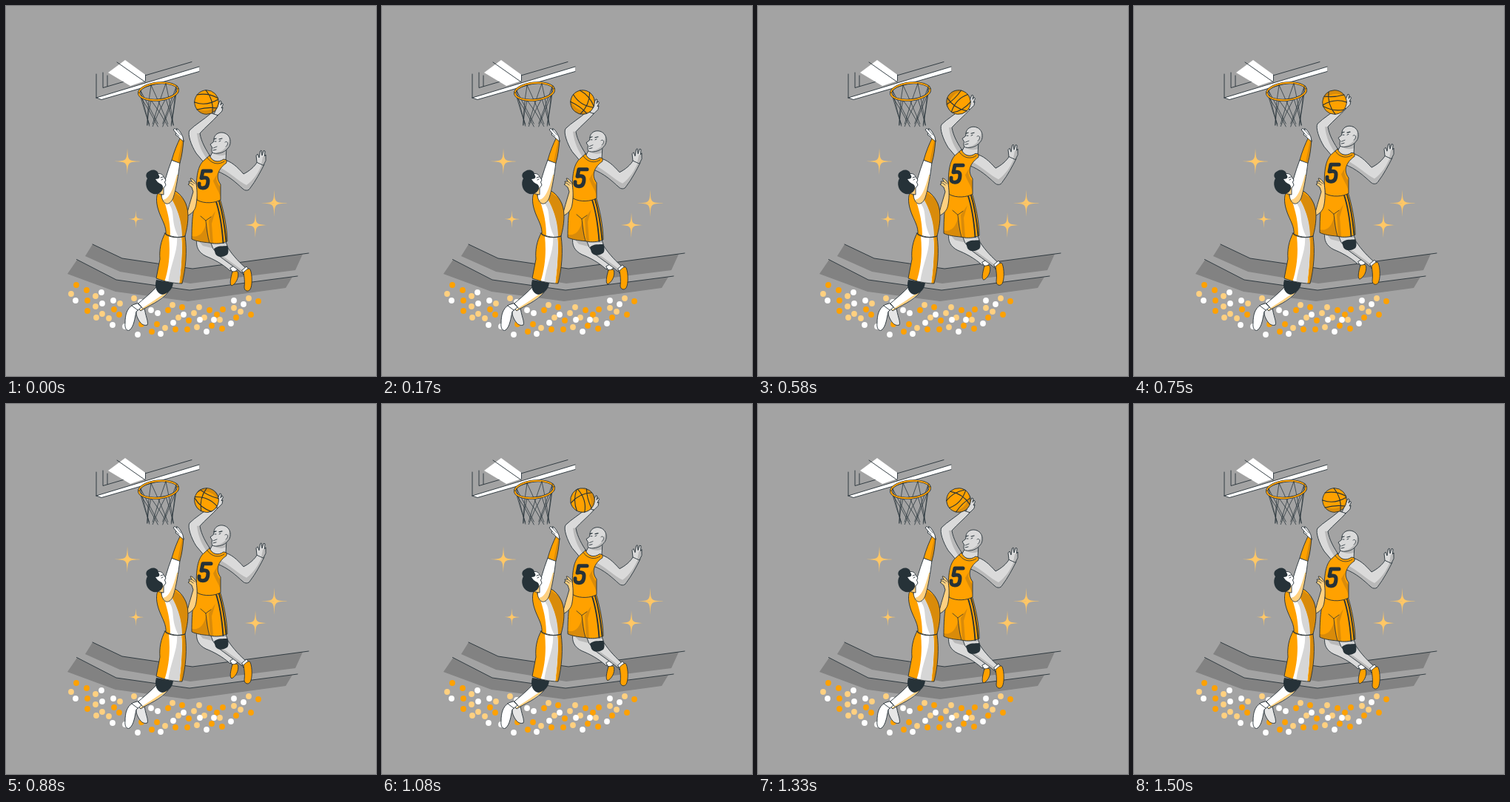
Recreate the animation shown at these times as an HTML page with a canvas. Size 500 by 500 pixels, loop 1540 ms.

```html
<!DOCTYPE html>
<html lang="en">
<head>
<meta charset="utf-8">
<title>Basketball</title>
<style>
  html, body { margin: 0; width: 100%; height: 100%; overflow: hidden; background: #a3a3a3; }
  canvas { display: block; width: 500px; height: 500px; }
</style>
</head>
<body>
<canvas id="stage"></canvas>
<script>
const LOOP = 1540, CYCLE = 1500, STEP = 1000 / 24, PHASE = 45, LIFT = 10;
const INK = '#263238', ORANGE = '#ffa100', SHADE = '#d98b0a', PEACH = '#ffd080', GOLD = '#ffc766',
      WHITE = '#fff', PALE = '#d6d6d6', SKIN = '#dadada', SKIN_SHADE = '#b9b9b9', STAND = '#828282';

const canvas = document.getElementById('stage');
const scale = Math.max(1, window.devicePixelRatio || 1);
canvas.width = canvas.height = 500 * scale;
const ctx = canvas.getContext('2d');

const paths = new Map();
function pathOf(d) {
  if (!paths.has(d)) paths.set(d, new Path2D(d));
  return paths.get(d);
}
function fill(d, color) {
  ctx.fillStyle = color;
  ctx.fill(pathOf(d));
}
function line(d, width = 0.9, color = INK) {
  ctx.strokeStyle = color;
  ctx.lineWidth = width;
  ctx.stroke(pathOf(d));
}
function shape(d, color, width) {
  fill(d, color);
  line(d, width);
}
// Fills a shape, lays shading inside it, then outlines it.
function shaded(d, color, ...shades) {
  fill(d, color);
  ctx.save();
  ctx.clip(pathOf(d));
  for (const [area, tone] of shades) fill(area, tone);
  ctx.restore();
  line(d);
}

function drawStands() {
  fill('M117 322 L157 341 L252 355 L401 335 L391 357 L249 375 L154 359 L107 338Z', STAND);
  fill('M96 343 L149 370 L248 384 L387 366 L378 381 L246 399 L148 386 L83 362Z', STAND);
  line('M117 322 L157 341 L252 355 L409 334');
  line('M95.5 342.5 L149 370 L248 384 L394 365');
}

const crowd = [
  [ORANGE, [95,377, 109,384, 110,398, 110,412, 146,410, 153,417, 183,430, 219,411, 204,430, 197,440,
    238,407, 247,425, 229,437, 245,437, 275,411, 285,417, 293,410, 278,432, 292,436, 311,421, 341,399, 331,417]],
  [PEACH, [88,389, 121,392, 121,406, 130,416, 122,421, 154,402, 139,422, 173,395, 225,404, 215,435,
    233,421, 261,407, 254,415, 268,421, 289,424, 258,434, 308,408, 317,413, 328,395]],
  [WHITE, [94,398, 129,387, 130,402, 145,398, 144,431, 161,433, 178,444, 182,400, 196,411, 205,415,
    209,443, 240,417, 226,428, 262,424, 281,424, 304,429, 271,440, 308,398, 321,403]]
];
function drawCrowd() {
  for (const [color, dots] of crowd) {
    ctx.fillStyle = color;
    for (let i = 0; i < dots.length; i += 2) {
      ctx.beginPath();
      ctx.arc(dots[i], dots[i + 1], 3.9, 0, Math.PI * 2);
      ctx.fill();
    }
  }
}

function drawStar(x, y, r) {
  const k = r * 0.04;
  ctx.save();
  ctx.translate(x, y);
  ctx.fillStyle = GOLD;
  for (let i = 0; i < 4; i++) {
    ctx.beginPath();
    ctx.moveTo(0, 0.5);
    ctx.lineTo(0, -r);
    ctx.bezierCurveTo(k, -k, k, -k, r, 0);
    ctx.lineTo(-0.5, 0.5);
    ctx.fill();
    ctx.rotate(Math.PI / 2);
  }
  ctx.restore();
}

function drawRim(from, to) {
  for (const [width, color] of [[3.2, INK], [1.9, ORANGE]]) {
    ctx.beginPath();
    ctx.ellipse(206, 115.5, 26.5, 11.5, -0.1, from, to);
    ctx.strokeStyle = color;
    ctx.lineWidth = width;
    ctx.stroke();
  }
}
function drawNet() {
  ctx.strokeStyle = INK;
  ctx.lineWidth = 0.75;
  const count = 8;
  for (let i = 0; i < count; i++) {
    for (const turn of [-1, 1]) {
      const a = (i + 0.5) / count * Math.PI * 2, b = a + turn;
      ctx.beginPath();
      ctx.moveTo(206 + 26 * Math.cos(a), 116 - 3 * Math.cos(a) + 11 * Math.sin(a));
      ctx.quadraticCurveTo(207 + 20 * Math.cos((a + b) / 2), 140 + 5 * Math.sin(a),
        208.5 + 18 * Math.cos(b), 161 + 2 * Math.sin(b));
      ctx.stroke();
    }
  }
}
function drawHoop() {
  line('M122 92 V124 M131 90 V110.5 L251 75.5 M137 94 V108.5');
  fill('M138 90 L161 73 L188.5 93 V101 L168 108Z', WHITE);
  line('M150 76 L188.5 103 M188.5 93 V101');
  fill('M122 124 L261 82 V88.5 L129 126.5Z', WHITE);
  line('M122 124 L261 82 M122 124 L129 126.5 L261 88.5');
  drawRim(Math.PI, Math.PI * 2);
  drawNet();
  drawRim(0, Math.PI);
}

function drawDunkerLegs() {
  shaded('M258 315 C256 325 260 333 270 338 C280 342 292 348 303 358 L309 353 C304 345 296 335 286 331 L277 318Z',
    SKIN, ['M258 315 L277 318 L282 328 L266 324Z', SKIN_SHADE]);
  shape('M303 354 L310 350 L313 356 L307 361Z', WHITE);
  shape('M306 359 C310 359 312 357 313.5 360 C315 368 310 376 305 378 C302 377 303 369 306 359Z', ORANGE);
  shaded('M276 317 L297 318 L300 327 C307 338 317 348 325 355 L319 361 C308 352 296 344 287 337 L280 328Z',
    SKIN, ['M276 317 L297 318 L298 322 L278 322Z M286 336 L296 340 L322 359 L319 363Z', SKIN_SHADE]);
  fill('M281 328 C287 323 293 325 299 324 C301 328 301 334 299 336 C293 340 286 340 283 335Z', INK);
  shape('M319 357 L325 352 L329 357 L321 363Z', WHITE);
  shape('M321 360 C324 357 328 353 330 356 C333 363 333 378 330 383 C327 387 322 385 322 380 C323 373 322 366 321 360Z', ORANGE);
}
function drawDunkerShorts() {
  shaded('M258 261 C253 272 251 286 251 315 C257 318 265 319 275 320 C284 322 292 321 299 318 C299 300 294 276 289 260Z',
    ORANGE,
    ['M251 311 C260 313 267 308 271 292 L275 321 L251 320Z', SHADE],
    ['M274 290 L283 277 L278 294 L280 321 L276 321Z', SHADE]);
  line('M283.5 263 C289 279 292 300 293.5 320 M287.5 262 C293 280 296 302 297.5 318', 1.8);
  line('M263 284 L270 290 C271 300 272 310 275 320 M270 290 L277 285', 0.8);
}
function drawDunkerBody() {
  // raised arm and hand
  shape('M282 144 L286 135 L289 128 L291 129 L290 134 L292 131 L293.5 133 L291 138 L293 137 L292 142 L287 147 L279 150Z', SKIN);
  shaded('M277 145 C267 154 256 160 248 168 C245 173 250 188 257 199 L268 212 L278 206 C270 194 264 184 262 172 C269 164 279 156 286 148Z',
    SKIN, ['M262 172 L258 172 C260 188 265 198 273 209 L280 206Z', SKIN_SHADE]);
  // lowered arm and hand
  shaded('M294 208 C304 209 313 218 321 227 C329 223 336 217 340 210 L349 214 C344 224 337 237 330 246 C328 250 323 250 320 247 C311 239 301 229 285 223Z',
    SKIN, ['M287 217 C302 224 314 237 325 242 C334 236 342 224 346 213 L351 215 L330 253 L284 226Z', SKIN_SHADE]);
  shaded('M339 211 L338 202 L340 200 L342 205 L343.5 196 L345 195 L346 202 L348 195.5 L350 196 L349.5 203 L351 201 L351 209 L348 215Z',
    SKIN, ['M347 204 L352 200 L349 216 L345 214Z', SKIN_SHADE]);
  // neck and head
  shaded('M281 194 L275 205 C280 211 288 212 297 208 L298 191Z',
    SKIN, ['M281 194 L298 189 L297 201 C291 203 285 202 280 199Z', SKIN_SHADE]);
  shaded('M281 180 C281 173 289 169 296 172 C305 176 305 188 299 193 C295 198 287 200 281 199 C277 198 278 194 278.5 191 L276 187 L280 184Z',
    SKIN, ['M302 176 C307 184 302 192 296 196 L283 201 L285 198 C295 196 301 189 302 176Z', SKIN_SHADE]);
  line('M296 184 C300 181 301 188 297 190 M280 192 L285 190', 0.8);
  line('M281 180 L284 179 M288 180 L292 179', 1.2);
  line('M282 183 L284 183 M288 183 L290 182 M280 195 L284 194', 0.9);
  // jersey
  shaded('M275 202 L267 209 C258 217 256 236 258 262 C268 268 283 266 290 262 L290 241 C284 233 284 222 298 212 L298 208 L294 207 C287 212 279 211 275 202Z',
    ORANGE, ['M286 226 C282 234 286 240 290 245 L291 262 C288 250 282 243 280 236Z', SHADE]);
  line('M272 205 C278 214 288 215 295 210', 0.8);
  line('M277 223 L266 223 L264 232.5 C268 231.5 273 231.5 273 236 C273 242 271 246 266 246 C262 246 260.5 244 261 240', 5);
}
function drawBall(turn) {
  ctx.save();
  ctx.translate(271, 130);
  ctx.rotate(turn);
  const disc = 'M-16.3 0 A16.3 16.3 0 1 1 16.3 0 A16.3 16.3 0 1 1 -16.3 0Z';
  shaded(disc, ORANGE, ['M-17 6 Q0 18 16 3 L16 18 L-16 18Z', SHADE]);
  line('M-16.3 0 Q0 6 16 -4 M-1 -16.3 Q10 -3 8 14 M-13 -10 Q2 -13 15.3 -5.5 M-13 10 Q2 6 14 8', 1.1);
  ctx.restore();
}

function drawBlocker() {
  // far arm
  shape('M244 284 C251 281 256 276 257 268 C259 257 258 246 257 240 C255 236 251 232 249 233 L251 237 L247 237 L248 240 L246 241 L251 245 L253 251 L248 268Z', PEACH);
  line('M249 239 L253 242 M251 237 L255 240', 0.8);
  // legs and shoes
  shape('M180 405 C175 409 175 416 178 422 C181 428 185 433 191 431 C193 427 188 418 187 407Z', '#e6e6e6');
  shaded('M205 378 C197 387 186 396 175 405 L182 412 C192 405 208 400 219 387Z',
    WHITE, ['M216 387 L221 386 L184 414 L180 411 L200 398Z', PEACH]);
  line('M179 402 L186 410');
  shape('M171 404 C163 409 161 418 161 428 C160 435 163 440 167 438 C173 433 174 422 176 413 L183 407 L178 402Z', WHITE);
  line('M170 405 L178 411');
  fill('M203 370 L226 374 C225 383 219 389 211 390 C204 389 200 380 203 370Z', INK);
  // shorts
  shaded('M215 307 C209 318 207 330 208 342 L203 368 C214 372 226 375 238 375 C243 355 245 331 242 311Z',
    ORANGE,
    ['M222 309 L237 313 C239 330 237 350 234 376 L214 373 C221 352 222 331 220 311Z', WHITE],
    ['M231 311 C233 330 222 350 219 374 L234 376 C237 350 239 330 237 312Z', PALE],
    ['M239 312 L245 312 L240 376 L236 376Z', SHADE]);
  // jersey
  shaded('M206 250 C202 258 203 268 207 279 C211 290 217 298 216 309 C223 313 233 314 242 311 C246 296 248 279 243 267 C238 256 231 250 224 248Z',
    ORANGE,
    ['M211 250 C213 267 222 280 222 312 L238 314 C238 291 232 273 221 262Z', WHITE],
    ['M219 266 C230 278 221 290 234 314 L239 314 C238 291 232 273 223 260Z', PALE],
    ['M222 248 C222 262 239 280 238 314 L248 310 L248 266Z', SHADE]);
  line('M214 307 C222 312 233 314 242 311');
  // raised arm
  shaded('M210 256 C213 241 218 224 224 208 L235 211 C233 228 230 247 226 259 C222 270 212 271 210 256Z',
    WHITE, ['M211 262 C221 262 226 246 231 228 L235 228 L226 264 L214 271Z', PEACH]);
  shaded('M224 208 C227 197 231 187 236 177 L240 181 C239 192 238 202 235 212Z',
    ORANGE, ['M238.5 179 L241 182 L236 213 L232 211Z', SHADE]);
  shape('M235 179 L232 176 L229 174 L230 172 L226 167 L228 165.5 L231 168 L230.5 165.5 L233 167 L236 171 L239 177 L240 183Z', WHITE);
  line('M230 172 L234 176 M231 168 L236 174', 0.7);
  // head
  shaded('M202 229 C206 224 212 227 213 231 L216 235 L214.5 238 L216 242 L213 246 L213 255 L202 253 L196 242Z',
    WHITE, ['M204 248 L214 245 L214 256 L203 254Z', PEACH]);
  fill('M206 228 C206 222 199 220 194 223 C189 225 188 230 191 233 C187 240 190 250 197 253 C203 256 210 253 212 247 C213 244 211 241 208 240 L205 238 L202 234 C207 234 209 231 206 228Z', INK);
  line('M209 232 L212 231 M210 235 L212 234', 0.9);
}

function draw(now) {
  const time = Math.floor((now % LOOP + 5) / STEP) * STEP;
  const part = (time + PHASE) % CYCLE / CYCLE;
  const rise = LIFT * (1 - Math.abs(2 * part - 1)) - LIFT * 2 * PHASE / CYCLE;

  ctx.setTransform(scale, 0, 0, scale, 0, 0);
  ctx.lineJoin = ctx.lineCap = 'round';
  ctx.fillStyle = '#a3a3a3';
  ctx.fillRect(0, 0, 500, 500);
  drawStands();
  drawCrowd();
  drawHoop();
  drawStar(164, 210, 18);
  drawStar(362.5, 266.5, 18);
  drawStar(337, 296, 17);
  drawStar(175.5, 288, 12);

  ctx.save();
  ctx.translate(0, -rise);
  drawDunkerLegs();
  drawDunkerShorts();
  drawDunkerBody();
  ctx.restore();
  drawBall(time / CYCLE * Math.PI * 2);
  drawBlocker();
}

const start = performance.now();
function tick() {
  draw(performance.now() - start);
  requestAnimationFrame(tick);
}
tick();
</script>
</body>
</html>
```
